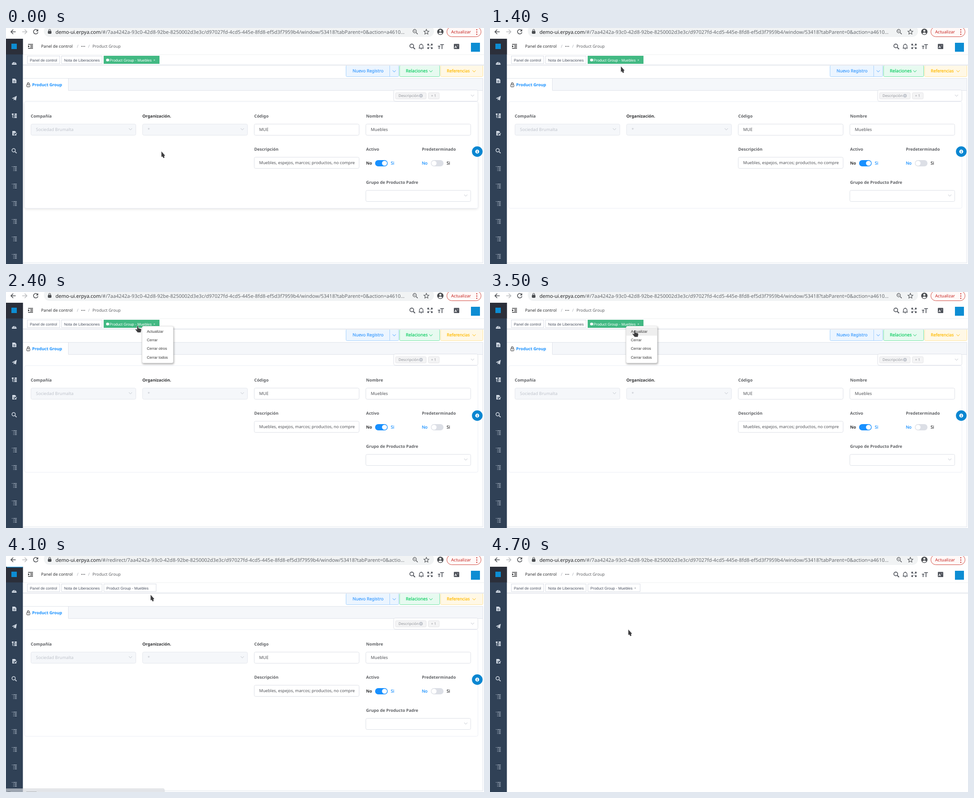
Animation of 1062x527 px, one loop 8000 ms. Source, as an HTML page:

```html
<!DOCTYPE html>
<html lang="es">
<head>
<meta charset="utf-8">
<title>Panel de control</title>
<style>
html, body { margin: 0; width: 100%; height: 100%; overflow: hidden; background: #fff; }
svg { display: block; width: 100vw; height: 100vh; text-rendering: geometricPrecision; }
text { font-family: "Noto Sans", "Open Sans", sans-serif; white-space: pre; }
.arial { font-family: "Liberation Sans", Arial, sans-serif; }
.bold { font-weight: 700; }
</style>
</head>
<body>
<svg id="stage" viewBox="0 0 1062 527" xmlns="http://www.w3.org/2000/svg"></svg>
<script>
const LOOP = 8000;
const INK = '#303133', GREY = '#606266', FIELD = '#505257', PALE = '#c0c4cc', LINE = '#dcdfe6', BLUE = '#1890ff';

// Drawing helpers
const text = (x, cy, s, size, fill = INK, cls = '', extra = '') =>
  `<text x="${x}" y="${cy + size * 0.36}" font-size="${size}" fill="${fill}" class="${cls}" ${extra}>${s}</text>`;
const medium = (x, cy, s, size, fill) => text(x, cy, s, size, fill, '', `stroke="${fill}" stroke-width=".25"`);
const box = (x, y, w, h, fill, stroke = 'none', r = 0, extra = '') =>
  `<rect x="${x}" y="${y}" width="${w}" height="${h}" rx="${r}" fill="${fill}" stroke="${stroke}" ${extra}/>`;
const path = (d, stroke, width = 1, fill = 'none') =>
  `<path d="${d}" fill="${fill}" stroke="${stroke}" stroke-width="${width}"/>`;
const shape = (d, fill) => path(d, 'none', 0, fill);
const dot = (x, y, r, fill, stroke = 'none', w = 1) =>
  `<circle cx="${x}" cy="${y}" r="${r}" fill="${fill}" stroke="${stroke}" stroke-width="${w}"/>`;
const group = (id, body) => `<g id="${id}">${body}</g>`;
const chevron = (x, y, color) => path(`M${x - 3.5} ${y - 2}l3.5 3.8l3.5 -3.8`, color, 1);
const lens = (x, y, r, color, w) =>
  dot(x - 1, y - 1, r, 'none', color, w) + path(`M${x + r * .6} ${y + r * .6}l${r * .9} ${r * .9}`, color, w * 1.2);
const lock = (x, y, color, fill) =>
  box(x - 3.5, y - 1, 7, 5.5, fill, color, 1) + path(`M${x - 2} ${y - 1}v-2a2 2 0 0 1 4 0v2`, color, 1.2);

function browserBar() {
  const dark = '#4a4d51';
  return box(0, 0, 1062, 24, '#fff') +
    box(84, -6, 867, 26, '#f1f3f4', 'none', 13) +
    path('M21.5 8.5H11.5M16 3.5L11 8.5L16 13.5', dark, 1.6) +
    path('M36 8.5H46M41.5 3.5L46.5 8.5L41.5 13.5', '#b9bbbe', 1.6) +
    path('M70.3 5.5A5 5 0 1 0 71 9.5', dark, 1.6) + shape('M71.5 2.5V7.5H66.5Z', dark) +
    lock(97, 8, dark, dark) +
    `<text x="110" y="12.6" font-size="11"><tspan fill="#202124">demo-ui.erpya.com</tspan><tspan id="route" fill="#64686d"></tspan></text>` +
    lens(909, 8, 3.8, dark, 1.2) + path('M906 7H910', dark, 1) +
    path('M934 3l1.6 3.7l4 .4l-3 2.7l.9 3.9l-3.5 -2.1l-3.5 2.1l.9 -3.9l-3 -2.7l4 -.4z', dark, 1.1) +
    dot(965, 8.5, 7, dark) + dot(965, 6.3, 2.3, '#fff') + shape('M960.5 12.3Q965 7.8 969.5 12.3Q965 16 960.5 12.3Z', '#fff') +
    box(979.5, -2.5, 76, 22, '#fff9f8', '#d0473d', 11) +
    text(989, 9, 'Actualizar', 9.5, '#c5221f') +
    [4, 9, 14].map(y => dot(1046, y, 1.2, '#c5221f')).join('');
}

// One wide row above three indented ones
function listIcon(y) {
  const rows = [-1.5, 1.5, 4.5].map(dy => `M16 ${y + dy}h1.5M19 ${y + dy}h5`).join('');
  return path(`M13 ${y - 4.5}h1.5M16 ${y - 4.5}h8${rows}`, '#c3cedb', 1.1);
}

function sidebar() {
  const c = '#d3dbe5', bg = '#304156';
  const page = y => shape(`M14 ${y - 5}h6l3 3v7h-9z`, c) + path(`M16 ${y}h5M16 ${y + 2.5}h5`, bg, 1);
  let out = box(0, 24, 37.5, 503, bg) + box(0, 24, 37.5, 35, '#2b2f3a') + box(12, 35, 12, 12, '#0d8dd3');
  out += shape('M13 82A5.3 5.3 0 1 1 23.5 82Z', c) + path('M18 80L20 76M15 79h1M21 79h1', bg, 1);
  out += page(118);
  out += shape('M13 157L24 151.5L22 162L18.5 159.5L17 162V158.5L21.5 154L16 158Z', c);
  out += box(13, 191, 4, 3, c) + box(19, 191, 5, 3, c) + box(19, 195, 5, 2.5, c) + box(19, 198.5, 5, 2.5, c) + path('M14.5 194V200H19M14.5 196.3H19', c, 1);
  out += page(235) + path('M18.5 239L24 233.5', bg, 2.6) + path('M19.5 239.5L24 235', c, 1.4);
  out += lens(18, 274, 3.7, c, 1.5);
  for (let i = 0; i < 6; i++) out += listIcon(Math.round(314 + i * 39.2));
  return out;
}

function header() {
  const c = '#4d5159';
  return path('M37.5 59.5H1062', '#eff0f2') +
    path('M49 36.5H60M54 39.5H60M54 42.5H60M49 45.5H60', INK, 1.4) + shape('M49 38.5L52.5 41L49 43.5Z', INK) +
    text(78, 41, 'Panel de control', 9.2) + text(157.5, 41, '/', 9.2, '#a5aab3') +
    [168, 171.3, 174.6].map(x => dot(x, 41, 1.1, GREY)).join('') +
    text(182.5, 41, '/', 9.2, '#a5aab3') + text(192, 41, 'Product Group', 9.15, GREY) +
    lens(902.5, 41, 4.2, c, 1.7) +
    path('M917 45H928M918.5 45V40.5A4 4 0 0 1 926.5 40.5V45M921.5 47H923.5M922.5 36V35', c, 1.4) +
    path('M937 39V36H940M944 36H947V39M947 43V46H944M940 46H937V43M937 36L940.5 39.5M947 36L943.5 39.5M947 46L943.5 42.5M937 46L940.5 42.5', c, 1.5) +
    path('M964.5 37H973M968.7 37V47M959.5 40.5H965M962.3 40.5V47', c, 1.7) +
    box(995, 35.5, 12, 11.5, c, 'none', 1) + text(996.5, 41.8, 'A', 7.5, '#fff', 'bold') + text(1002.5, 39.5, 'z', 5, '#fff') +
    box(1033, 33, 20, 20, '#0d8dd3');
}

const tab = (x, w, label) => box(x + .5, 62.5, w, 17, '#fff', '#d8dce5') + text(x + 6, 71.5, label, 8.4, '#495060', 'arial');

function tabBar() {
  return box(37.5, 82, 1024.5, 1, '#d8dce5') + box(37.5, 83, 1024.5, 1, '#f1f2f5') +
    tab(47, 72, 'Panel de control') + tab(123, 90, 'Nota de Liberaciones') +
    group('tabOn', box(217, 62, 124, 18, '#42b983') + box(222.5, 68.5, 6.5, 6, '#fff', 'none', 2.5) +
      text(230, 71.5, 'Product Group - Muebles', 8.4, '#fff', 'arial') + text(327.5, 71.5, '×', 7, '#fff', 'arial')) +
    group('tabOff', tab(217, 116, 'Product Group - Muebles') +
      group('tabClose', text(320.5, 71.5, '×', 7, '#7d828c', 'arial')));
}

const label = (x, y, s, color = GREY) => text(x, y, s, 9.25, color, 'bold');
const input = (x, y, s = '', off = false) =>
  box(x + .5, y + .5, 233, 25, off ? '#f5f7fa' : '#fff', off ? '#e4e7ed' : LINE, 3) +
  text(x + 11.5, y + 13, s, s.length > 20 ? 9.25 : 9.45, off ? PALE : FIELD, '', 'clip-path="url(#fieldClip)"');
const toggle = (x, on) => box(x, 295, 28, 14, on ? BLUE : LINE, 'none', 7) + dot(on ? x + 21 : x + 7, 302, 5.6, '#fff');
const button = (x, w, s, size, color, fill, edge) =>
  box(x + .5, 83.5, w, 25, fill, edge, 2) + medium(x + 14.3, 96, s, size, color) + chevron(x + w - 19, 96.5, color);

function form() {
  return box(755.5, 83.5, 117, 25, '#ecf5ff', '#a3d0fd', 2) + path('M852.5 84V108', '#a3d0fd') +
    medium(770, 96, 'Nuevo Registro', 9.55, '#409eff') + chevron(862.5, 96.5, '#409eff') +
    button(874, 89, 'Relaciones', 9.7, '#13ce66', '#e7faf0', '#71e2a3') +
    button(965, 94, 'Referencias', 9.4, '#ffba00', '#fff8e6', '#ffe399') +
    box(139, 112, 920, 27, '#f5f7fa') +
    path('M37.5 112.5H1059M138.5 112V139.5H1059M1059.5 112V524.5H37.5', '#dfe3ea') +
    lock(49.5, 127, INK, '#fff') + dot(49.5, 128.7, .8, INK) + text(58, 126.5, 'Product Group', 9.2, BLUE, 'bold') +
    group('shade', box(41, 166, 1007, 238, '#000', 'none', 3, 'opacity=".13" filter="url(#blur)"')) +
    box(41.5, 164.5, 1007, 238, '#fff', '#ebeef5', 3) +
    box(861.5, 138.5, 187, 25, '#fff', LINE, 3) +
    box(865.5, 144.5, 68, 14, '#f4f4f5', '#e4e4e7', 2) + text(872, 151.3, 'Descripción', 8.2, '#909399') +
    dot(922, 151.3, 4, PALE) + path('M920.5 149.8l3 3m0 -3l-3 3', '#fff', .8) +
    box(938.5, 144.5, 24, 14, '#f4f4f5', '#e4e4e7', 2) + text(944.5, 151.3, '+ 1', 8, '#909399') + chevron(1036.5, 151, PALE) +
    label(55, 196.5, 'Compañía') + label(303, 196.5, 'Organización.', INK) + label(551.5, 196.5, 'Código') + label(800, 196.5, 'Nombre') +
    input(55, 214, 'Sociedad Brumalta', true) + chevron(276.5, 226, PALE) +
    input(303, 214, '*', true) + chevron(525, 226, PALE) +
    input(551, 214, 'MUE') + input(799, 214, 'Muebles') +
    label(551.5, 270.5, 'Descripción') + label(800, 270.5, 'Activo') + label(924, 270.5, 'Predeterminado') +
    input(551, 288, 'Muebles, espejos, marcos; productos, no comprende') +
    label(800, 302, 'No', INK) + toggle(820, true) + medium(855, 302, 'Si', 9.4, BLUE) +
    medium(924, 302, 'No', 9.2, BLUE) + toggle(944, false) + medium(979, 302, 'Si', 9.4, INK) +
    label(800, 344.5, 'Grupo de Producto Padre') + input(799, 362) + chevron(1021.5, 374, PALE) +
    dot(1047, 276, 11.8, '#0a86d1') + dot(1047, 276, 4.4, '#fff') + path('M1047 275V279M1047 273V274.2', '#0a86d1', 1.4);
}

function menu() {
  return box(303, 78, 70, 83, '#000', 'none', 3, 'opacity=".35" filter="url(#soft)"') +
    box(302.5, 76.5, 69, 82, '#fff', '#e4e4e4', 3) +
    group('hover', box(303, 79, 68, 18.5, '#eee')) +
    ['Actualizar', 'Cerrar', 'Cerrar otros', 'Cerrar todos'].map((s, i) =>
      text(313, 88 + i * 19.2, s, 8.4, '#333', 'arial')).join('');
}

const ARROW = 'M0 0V13.5L2.5 12L4.5 15.8L7.5 14.5L6.5 11L8.7 9.8Z';
const HAND = 'M4 1.2Q5.5 -.6 7 1.2V5.5L12.5 7Q14.3 7.8 13.6 10.5L12.5 15.5H5.5L1 10Q-.4 8.2 1.5 7.5L4 9Z';

document.getElementById('stage').innerHTML =
  `<defs>
    <clipPath id="fieldClip"><rect x="55" y="164" width="720" height="240"/><rect x="799" y="164" width="235" height="240"/></clipPath>
    <filter id="blur" x="-5%" y="-10%" width="110%" height="120%"><feGaussianBlur stdDeviation="3"/></filter>
    <filter id="soft" x="-20%" y="-20%" width="140%" height="140%"><feGaussianBlur stdDeviation="2"/></filter>
  </defs>` +
  box(0, 0, 1062, 527, '#fff') + group('form', form()) + header() + tabBar() + sidebar() + browserBar() +
  group('loading', box(2, 24, 35, 1.5, '#29d')) +
  group('status', box(-2, 519.5, 354, 12, '#d8dbe0', '#cdd0d5', 3) + path('M3 526.5H10M45 526.5H68', '#8b8e93', 1)) +
  group('menu', menu()) +
  group('cursor', group('arrow', path(ARROW, '#fff', .6, '#3d3d3f')) + group('hand', path(HAND, '#fff', .6, '#3d3d3f')));

const el = Object.fromEntries([...document.querySelectorAll('g[id], #route')].map(n => [n.id, n]));

// Pointer stops: time, x, y
const STOPS = [
  [0, 345, 275], [1000, 340, 260], [1100, 328, 220], [1200, 313, 165], [1300, 298, 112],
  [1400, 290.5, 85], [1500, 289, 82], [1600, 289, 79], [1700, 290, 76.5], [1800, 291, 74.5],
  [1900, 287, 75], [3500, 316, 85], [3700, 321, 86], [4700, 307, 163.5]
];
const TARGET = '7aa4242a-93c0-42d8-92be-8250002d3e3c/d97027fd-4cd5-445e-8fd8-ef5d3f7959b4/window/53418?tabParent=0&';
const show = (node, on) => node.setAttribute('visibility', on ? 'visible' : 'hidden');
const within = (t, from, to) => t >= from && t < to;

function render(t) {
  const [, x, y] = STOPS.findLast(s => s[0] <= t);
  el.cursor.setAttribute('transform', `translate(${x} ${y})`);
  const pointing = within(t, 1900, 3700);
  show(el.hand, pointing);
  show(el.arrow, !pointing);

  show(el.menu, within(t, 2400, 3700));
  show(el.hover, within(t, 3500, 3700));
  show(el.tabOn, t < 3900);
  show(el.tabOff, t >= 3900);
  show(el.tabClose, t >= 4400);
  show(el.loading, within(t, 3900, 4400));
  show(el.status, within(t, 3700, 4400));
  el.status.setAttribute('opacity', t < 4100 ? 1 : .65);

  const route = within(t, 3700, 4700) ? '/#/redirect/' + TARGET + 'actio...' : '/#/' + TARGET + 'action=a4610...';
  if (el.route.textContent !== route) el.route.textContent = route;

  // The card's hover shadow fades once the pointer has left it
  el.shade.setAttribute('opacity', Math.max(0, Math.min(1, (1400 - t) / 200)));
  const leaving = t >= 4400;
  show(el.form, t < 4700);
  el.form.setAttribute('opacity', leaving ? .1 : 1);
  el.form.setAttribute('transform', `translate(${leaving ? 19 : 0} 0)`);
}

const start = performance.now();
function tick() {
  render((performance.now() - start) % LOOP);
  requestAnimationFrame(tick);
}
tick();
</script>
</body>
</html>
```
